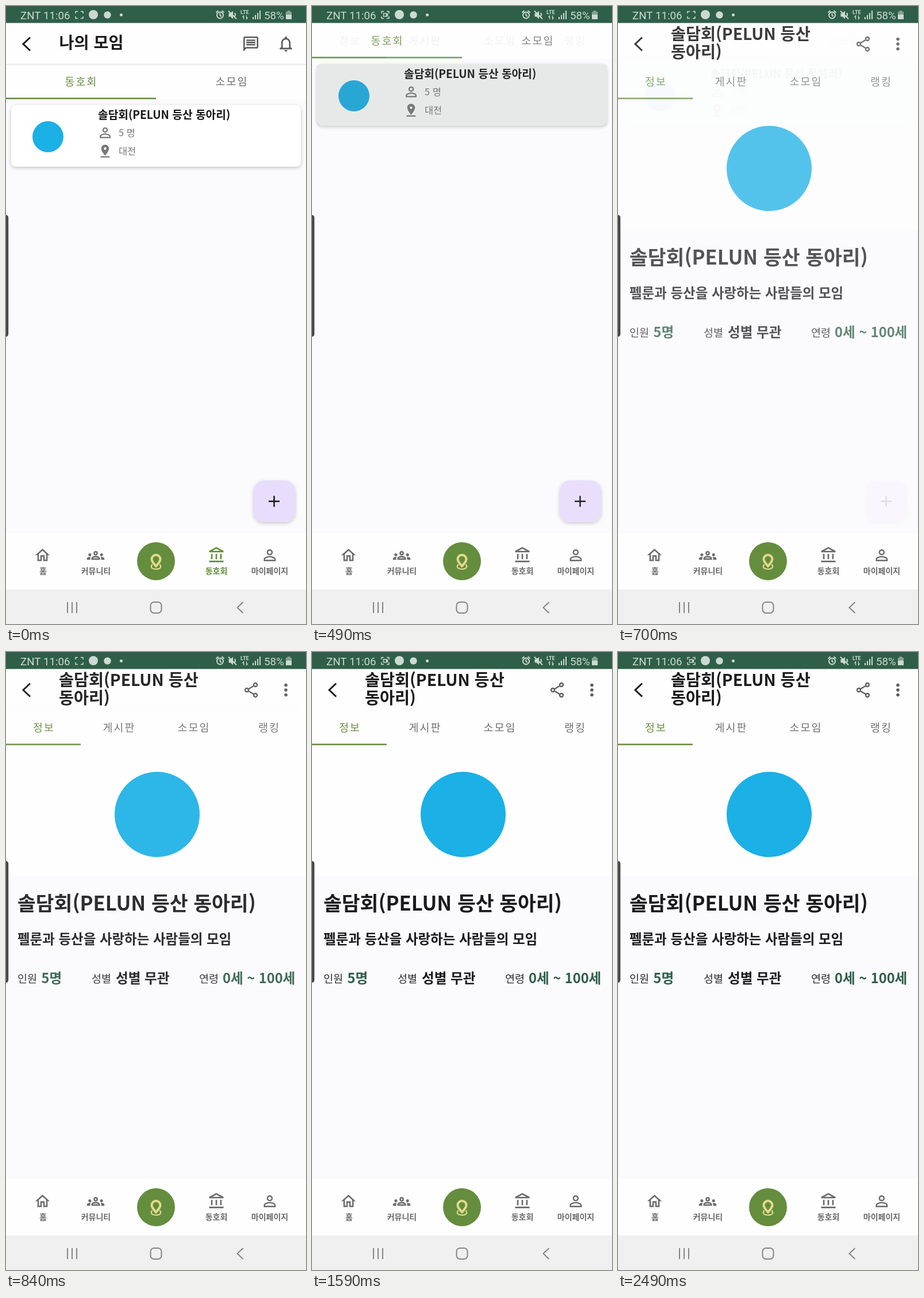
Write an HTML page that moves like this. It is 522 px wide and 1073 px high and loops after 2.56 s.

```html
<!DOCTYPE html>
<html lang="ko">
<head>
<meta charset="utf-8">
<title>나의 모임</title>
<style>
html, body { margin: 0; width: 100%; height: 100%; overflow: hidden; background: #fbfbfd; }
svg { display: block; width: 100%; height: 100%; }
text { font-family: "Noto Sans CJK KR", "Noto Sans CJK", sans-serif; fill: currentColor; }
.roboto { font-family: Roboto, sans-serif; }
.bold { font-weight: 700; }
.tab { font-size: 18.4px; letter-spacing: 2px; text-anchor: middle; color: #6f6f6f; }
.tab.active { color: #668f40; }
.small { font-size: 16.4px; color: #777; }
.title { font-size: 28.3px; font-weight: 700; color: #1b1b1d; }
.label { font-size: 18.5px; color: #2a2a2c; }
.value { font-size: 23.6px; font-weight: 700; color: #1b1b1d; }
.value.green { color: #2d5e47; }
.nav { color: #6a6a6a; }
.nav text { font-size: 14px; font-weight: 700; text-anchor: middle; }
.line { fill: none; stroke: currentColor; }
.icon { fill: currentColor; }

.list-bar, .list, .list-body, .detail, .detail-bar, .shift, .loaded, .ripple, .club-tab, .record {
  animation-duration: 2560ms; animation-iteration-count: infinite; animation-timing-function: linear;
}
.list-bar { animation-name: leave; animation-timing-function: step-end; }
.list { animation-name: fade-out; }
.list-body { animation-name: lift; animation-timing-function: step-end; }
.ripple { animation-name: press; }
.detail { animation-name: fade-in; }
.shift { animation-name: drop; animation-timing-function: step-end; }
.loaded { animation-name: load; animation-timing-function: step-end; }
.detail-bar { animation-name: bar-in; }
.club-tab { animation-name: deselect; animation-timing-function: step-end; }
.record { animation-name: blink; animation-timing-function: step-end; }

@keyframes leave { 0% { opacity: 1 } 16.8%, 100% { opacity: 0 } }
@keyframes lift { 0% { transform: none } 16.8%, 100% { transform: translateY(-71px) } }
@keyframes drop { 0% { transform: translateY(-71px) } 22.3%, 100% { transform: none } }
@keyframes load { 0% { opacity: 0 } 22.3%, 100% { opacity: 1 } }
@keyframes press { 0%, 6% { opacity: 0 } 15%, 100% { opacity: .1 } }
@keyframes fade-out {
  0%, 17.2% { opacity: 1 } 19.2% { opacity: .93 } 24.6% { opacity: .32 }
  27.4% { opacity: .12 } 32.5%, 100% { opacity: 0 }
}
@keyframes fade-in {
  0%, 17.6% { opacity: 0 } 19.2% { opacity: .09 } 24.6% { opacity: .55 } 27.4% { opacity: .75 }
  32.8% { opacity: .92 } 40.6% { opacity: .98 } 45.7%, 100% { opacity: 1 }
}
@keyframes bar-in {
  0%, 22.2% { opacity: 0 } 22.3% { opacity: .5 } 27.4% { opacity: .86 }
  32.8% { opacity: .95 } 42%, 100% { opacity: 1 }
}
@keyframes deselect { 0% { color: #5f8f38 } 16.8%, 100% { color: #6a6a6a } }
@keyframes blink {
  0% { opacity: 0 } 11.3% { opacity: 1 } 25.4% { opacity: 0 }
  50.4% { opacity: 1 } 64.5% { opacity: 0 } 89.4%, 100% { opacity: 1 }
}
</style>
</head>
<body>
<svg viewBox="0 0 522 1073" preserveAspectRatio="none">
  <defs>
    <filter id="shadow" x="-20%" y="-20%" width="140%" height="150%">
      <feDropShadow dx="0" dy="2" stdDeviation="3" flood-opacity=".22"/>
    </filter>
    <path id="person" d="M12 5.9a2.1 2.1 0 110 4.2 2.1 2.1 0 010-4.2m0 9c2.97 0 6.1 1.46 6.1 2.1v1.1H5.9V17c0-.64 3.13-2.1 6.1-2.1M12 4C9.79 4 8 5.79 8 8s1.79 4 4 4 4-1.79 4-4-1.79-4-4-4zm0 9c-2.67 0-8 1.34-8 4v3h16v-3c0-2.66-5.33-4-8-4z"/>
    <path id="pin" d="M18 8c0-3.31-2.69-6-6-6S6 4.69 6 8c0 4.5 6 11 6 11s6-6.5 6-11zm-8 0c0-1.1.9-2 2-2s2 .9 2 2-.89 2-2 2c-1.1 0-2-.9-2-2z"/>
    <path id="back" class="line" d="M42 54.5L30 66l12 11.5" stroke-width="3"/>
  </defs>

  <rect width="522" height="1073" fill="#fbfbfd"/>
  <rect y="29" width="522" height="62" fill="#fefefe"/>

  <!-- club list -->
  <g class="list">
    <g class="list-body">
      <rect y="101" width="522" height="61" fill="#fefefe"/>
      <text class="tab active" x="131" y="138">동호회</text>
      <text class="tab" x="393" y="138">소모임</text>
      <rect y="159.2" width="261" height="2.6" fill="#668f40"/>
      <rect x="9" y="172" width="504" height="107" rx="9" fill="#fff" filter="url(#shadow)"/>
      <circle cx="73" cy="227" r="27" fill="#1bb0e6"/>
      <text class="bold" x="160" y="195.5" font-size="19.2" color="#151515">솔담회(PELUN 등산 동아리)</text>
      <g class="small">
        <use href="#person" class="icon" transform="translate(158.5 206) scale(1.17)"/>
        <text x="196" y="226">5 명</text>
        <g class="icon" transform="translate(159 238.5) scale(1.12)">
          <use href="#pin"/><path d="M5 20h14v2H5z"/>
        </g>
        <text x="196" y="258">대전</text>
      </g>
      <rect class="ripple" x="9" y="172" width="504" height="107" rx="6" fill="#0a2018"/>
    </g>
    <rect x="431" y="824" width="72" height="72" rx="18" fill="#e8ddfc" filter="url(#shadow)"/>
    <path class="line" d="M457 860h19M466.5 850.5v19" color="#111" stroke-width="2.4"/>
  </g>

  <!-- club detail: the tabs come first, the content once loaded -->
  <g class="detail">
    <g class="shift">
      <rect y="101" width="522" height="61" fill="#fefefe"/>
      <text class="tab active" x="66" y="138">정보</text>
      <text class="tab" x="197" y="138">게시판</text>
      <text class="tab" x="327" y="138">소모임</text>
      <text class="tab" x="458" y="138">랭킹</text>
      <rect y="159.2" width="130" height="2.6" fill="#668f40"/>
    </g>
    <g class="loaded">
      <rect y="162" width="522" height="227" fill="#fefefe"/>
      <circle cx="263" cy="282" r="74" fill="#1bb0e6"/>
      <text class="bold" x="20" y="449" font-size="34.6" color="#1b1b1d">솔담회(PELUN 등산 동아리)</text>
      <text class="bold" x="20" y="507" font-size="23.5" color="#1b1b1d">펠룬과 등산을 사랑하는 사람들의 모임</text>
      <text class="label" x="20" y="574">인원</text>
      <text class="value green" x="61.5" y="574.5">5명</text>
      <text class="label" x="149" y="574">성별</text>
      <text class="value" x="191" y="574.5">성별 무관</text>
      <text class="label" x="336" y="574">연령</text>
      <text class="value green" x="377" y="574.5">0세 ~ 100세</text>
    </g>
  </g>

  <!-- toolbars -->
  <g class="list-bar">
    <rect y="29" width="522" height="72" fill="#fefefe"/>
    <rect y="100.5" width="522" height="2" fill="#ebebed"/>
    <use href="#back" color="#1b1b1d"/>
    <text class="title" x="92.5" y="74">나의 모임</text>
    <g class="icon" color="#5c5c5c">
      <path transform="translate(410.4 50.4) scale(1.3)" d="M4 4h16v12H5.17L4 17.17V4m0-2c-1.1 0-1.99.9-1.99 2L2 22l4-4h14c1.1 0 2-.9 2-2V4c0-1.1-.9-2-2-2H4zm2 10h12v2H6v-2zm0-3h12v2H6V9zm0-3h12v2H6V6z"/>
      <path transform="translate(470.8 49.5) scale(1.35)" d="M12 22c1.1 0 2-.9 2-2h-4c0 1.1.9 2 2 2zm6-6v-5c0-3.07-1.63-5.64-4.5-6.32V4c0-.83-.67-1.5-1.5-1.5s-1.5.67-1.5 1.5v.68C7.64 5.36 6 7.92 6 11v5l-2 2v1h16v-1l-2-2zm-2 1H8v-6c0-2.48 1.51-4.5 4-4.5s4 2.02 4 4.5v6z"/>
    </g>
  </g>
  <g class="detail-bar">
    <rect y="29" width="522" height="72" fill="#fefefe"/>
    <use href="#back" color="#1b1b1d"/>
    <text class="title" x="92" y="59">솔담회(PELUN 등산</text>
    <text class="title" x="92" y="90">동아리)</text>
    <g color="#5c5c5c">
      <path class="line" d="M434 57l-15 9 15 9" stroke-width="2.2"/>
      <g fill="#fefefe" stroke="currentColor" stroke-width="2.3">
        <circle cx="434" cy="57" r="3"/><circle cx="419" cy="66" r="3"/><circle cx="434" cy="75" r="3"/>
      </g>
      <g class="icon">
        <circle cx="487" cy="57.5" r="2.8"/><circle cx="487" cy="66" r="2.8"/><circle cx="487" cy="74.5" r="2.8"/>
      </g>
    </g>
  </g>

  <!-- status bar -->
  <rect width="522" height="29.5" fill="#2f5f48"/>
  <g color="#ccdad2">
    <g font-size="18.7">
      <text class="roboto" x="25" y="22.5">ZNT</text>
      <text class="roboto" x="65" y="22.5">11:06</text>
      <text class="roboto" x="449" y="22.5">58%</text>
    </g>
    <path class="line" d="M121 13V9.5h4M130 9.5h4V13M134 18v3.5h-4M125 21.5h-4V18" stroke-width="1.5"/>
    <path class="line record" d="M124.5 13h5v5h-5zM129.5 15.5l2-2v4z" stroke-width="1.4"/>
    <g class="icon">
      <circle cx="152" cy="15" r="8"/>
      <circle cx="176.5" cy="15.5" r="6.2"/>
      <circle cx="200.5" cy="15.5" r="2.5"/>
      <path d="M387.5 12.5h3l4.500-4v14l-4.500-4h-3z"/>
      <path d="M429 19h2v4h-2zM433 15.5h2V23h-2zM437 12h2v11h-2zM441 8h2v15h-2z"/>
      <path d="M487 10h2.5V8h5v2H497v13h-10z" opacity=".55"/>
      <path d="M487 15h10v8h-10z"/>
      <text class="roboto bold" x="408" y="14" font-size="9">LTE</text>
    </g>
    <g class="line" stroke-width="2">
      <circle cx="372.5" cy="16" r="5.5"/>
      <path d="M372.5 12.5v4l2.500 1.500M365.5 11.5l4-3.500M379.5 11.5l-4-3.500M387 8.5l14 14M398 12q2 3 0 6"/>
      <path d="M413.5 23v-6l-2 2.500M418.5 16.5v6l2-2.500" stroke-width="1.3"/>
    </g>
  </g>

  <!-- bottom navigation -->
  <rect y="915" width="522" height="98" fill="#fefefe"/>
  <g class="nav">
    <path class="icon" transform="translate(48.4 938.5) scale(1.26)" d="M12 5.69l5 4.5V18h-2v-6H9v6H7v-7.81l5-4.5M12 3L2 12h3v8h6v-6h2v6h6v-8h3L12 3z"/>
    <text x="64.5" y="986">홈</text>
    <g class="icon" transform="translate(140.8 938.7) scale(1.27)">
      <circle cx="4" cy="11" r="2"/><circle cx="20" cy="11" r="2"/>
      <path d="M5.13 14.1C3.8 13.9 2.4 14.1 1.22 14.58A2 2 0 000 16.43V18h4.5v-1.61c0-.83.23-1.61.63-2.29zM18.87 14.1c1.33-.2 2.73 0 3.91.48A2 2 0 0124 16.43V18h-4.5v-1.61c0-.83-.23-1.61-.63-2.29z"/>
      <path class="line" d="M7 17v-.6c0-.8.4-1.5 1.2-1.85 2.4-1.07 5.2-1.07 7.6 0 .8.35 1.2 1.05 1.2 1.85v.6z" stroke-width="2"/>
      <circle class="line" cx="12" cy="9" r="2" stroke-width="2"/>
    </g>
    <text x="156.5" y="986">커뮤니티</text>
    <g class="club-tab">
      <path class="icon" transform="translate(350.8 938) scale(1.32)" d="M6.5 10h-2v7h2v-7zm6 0h-2v7h2v-7zm8.5 9H2v2h19v-2zm-2.5-9h-2v7h2v-7zm-7-6.74L16.71 6H6.29l5.21-2.74m0-2.26L2 6v2h19V6l-9.5-5z"/>
      <text x="366" y="986">동호회</text>
    </g>
    <use href="#person" class="icon" transform="translate(443.3 938) scale(1.3)"/>
    <text x="459" y="986">마이페이지</text>
  </g>
  <circle cx="261" cy="964" r="33" fill="#658d3e"/>
  <g class="line" color="#e2da8c">
    <path d="M254.500 969.500c-9 11 22 11 13 0" stroke-width="2.2"/>
    <path d="M261 972.500c-4-4.500-7.500-8-7.500-12a7.500 7.500 0 0115 0c0 4-3.500 7.500-7.500 12z" stroke-width="4"/>
  </g>

  <!-- system keys -->
  <rect y="1013" width="522" height="60" fill="#f0f0f0"/>
  <g class="line" color="#858585" stroke-width="2">
    <path d="M107 1035v19M115 1035v19M123 1035v19M412.5 1035l-10 9.500 10 9.500"/>
    <rect x="251.5" y="1035" width="19" height="19" rx="6"/>
  </g>

  <path d="M0 363q4.200 0 4.200 5v201q0 5-4.200 5z" fill="#48484a"/>
</svg>
</body>
</html>
```
